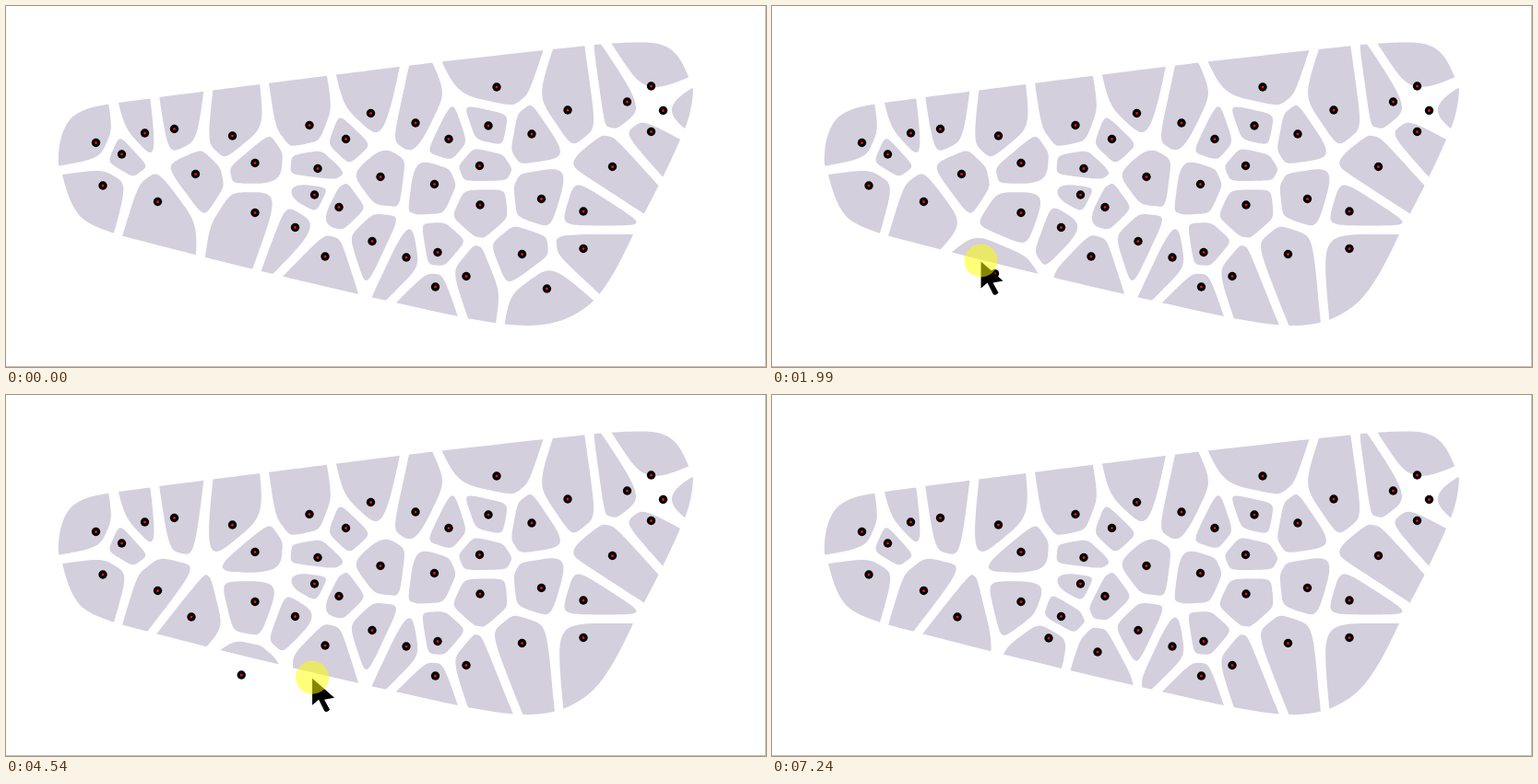
Write an HTML page with a canvas that moves like this. It is 824x392 px and loops after 7.8 s.

```html
<!DOCTYPE html>
<html lang="en">
<head>
<meta charset="utf-8">
<title>Voronoi wing</title>
<style>
html, body { margin: 0; width: 100%; height: 100%; overflow: hidden; background: #fff; }
canvas { display: block; }
</style>
</head>
<body>
<canvas id="stage" width="824" height="392"></canvas>
<script>
const ctx = document.getElementById('stage').getContext('2d');
const LOOP = 7800;
const INSET = 4.8;
const MIN_EDGE = 8.5;
const LAG = 100;
const BOX = [[-60, -60], [895, -60], [895, 415], [-60, 415]];

// Sites that stay in place
const FIXED = [
  [97.5, 148.5], [125.5, 161], [150.5, 138], [182.5, 133.5], [245.5, 141], [329, 129.5], [368.5, 144.5],
  [395.5, 116.5], [444, 127], [480, 144.5], [523, 130], [532, 88], [570, 139], [609, 113], [673.5, 104],
  [699.5, 87], [712.5, 113.5], [699.5, 136.5], [657.5, 174.5], [626, 223], [626, 263.5], [559.5, 269.5],
  [580.5, 209.5], [514, 216], [513.5, 173.5], [464.5, 193.5], [406, 185.5], [338, 176.5], [334.5, 205],
  [361, 218.5], [397, 255.5], [434, 273], [468, 267.5], [465.5, 305], [499, 293.5], [313.5, 240.5],
  [270, 224.5], [270, 170.5], [164.5, 212.5], [105, 195]
];

// Pointer strokes: smooth curves through evenly timed points
const STROKES = [
  { from: 70, to: 2390, pts: [[604, 382], [586.5, 307], [530, 350], [389, 363], [296, 332], [225, 275], [201, 241]] },
  { from: 2600, to: 4060, pts: [[201, 241], [205.5, 182.5], [202, 187], [165, 213], [128, 270.5]] },
  { from: 4060, to: 5160, pts: [[128, 270.5], [185, 298], [365, 306], [330, 282], [300, 264]] },
  { from: 5560, to: 7240, pts: [[300, 264], [346, 272], [400, 330], [310, 342], [315, 302], [353, 279], [450, 322], [680, 390]] }
];

// Each drag moves the site found under the pointer when pressed
const DRAGS = [{ from: 457, to: 2590 }, { from: 2965, to: 5390 }, { from: 5800, to: 6760 }];

const wing = new Path2D(
  'M57 172 C56 149 62 128 74 119 C85 111 98 108.5 113 106.5 C140 102 400 69 472 60.5 ' +
  'C530 54 600 46 640 42 C665 40 685 39 700 40 C722 42 731 54 740 77 L745 91 ' +
  'C744 112 739 128 731 145 C715 182 700 210 680 248 C665 280 652 305 637 320 ' +
  'C615 341 590 347 565 347 C545 347 520 343 490 337 C420 322 262 286 126 249.5 ' +
  'C101 242 88 236 80 228 C69 215 64 195 61 183 Z');
const arrow = new Path2D('M0 1 L0 30 L7 24 L13 36 Q15 39 19 35 L13 24 L24 22 Z');

const mid = (a, b) => [(a[0] + b[0]) / 2, (a[1] + b[1]) / 2];
const dist = (a, b) => Math.hypot(b[0] - a[0], b[1] - a[1]);
const clamp = (v, lo, hi) => Math.min(Math.max(v, lo), hi);

const spline = (a, b, c, d, u) =>
  b + u / 2 * (c - a + u * (2 * a - 5 * b + 4 * c - d + u * (3 * (b - c) + d - a)));

function pointer(t) {
  const { from, to, pts } = STROKES.filter(s => s.from <= t).pop() || STROKES[0];
  const last = pts.length - 1;
  const pos = clamp((t - from) / (to - from), 0, 1) * last;
  const i = Math.min(Math.floor(pos), last - 1);
  const at = k => pts[clamp(k, 0, last)];
  return [0, 1].map(n => spline(at(i - 1)[n], at(i)[n], at(i + 1)[n], at(i + 2)[n], pos - i));
}

const sitesAt = t => FIXED.concat(DRAGS.map(d => pointer(clamp(t - LAG, d.from, d.to))));

// Keeps the part of poly nearer to a than to b, less the inset
function clipHalf(poly, a, b) {
  const len = dist(a, b) || 1;
  const nx = (b[0] - a[0]) / len, ny = (b[1] - a[1]) / len;
  const m = mid(a, b);
  const side = p => (p[0] - m[0]) * nx + (p[1] - m[1]) * ny + INSET;
  const out = [];
  poly.forEach((p, i) => {
    const q = poly[(i + 1) % poly.length];
    const sp = side(p), sq = side(q);
    if (sp <= 0) out.push(p);
    if ((sp <= 0) !== (sq <= 0)) {
      const u = sp / (sp - sq);
      out.push([p[0] + (q[0] - p[0]) * u, p[1] + (q[1] - p[1]) * u]);
    }
  });
  return out;
}

const cell = (site, sites) =>
  sites.reduce((poly, other) => other === site ? poly : clipHalf(poly, site, other), BOX);

// Joins edge midpoints with the corners as handles; short edges are skipped
function fillSmooth(poly) {
  const edges = poly
    .map((a, i) => ({ a, b: poly[(i + 1) % poly.length] }))
    .filter(e => dist(e.a, e.b) > MIN_EDGE);
  if (edges.length < 2) return;
  ctx.beginPath();
  ctx.moveTo(...mid(edges[0].a, edges[0].b));
  edges.forEach((e, i) => {
    const next = edges[(i + 1) % edges.length];
    ctx.bezierCurveTo(...e.b, ...next.a, ...mid(next.a, next.b));
  });
  ctx.fill();
}

function disc([x, y], r, color) {
  ctx.fillStyle = color;
  ctx.beginPath();
  ctx.arc(x, y, r, 0, Math.PI * 2);
  ctx.fill();
}

function drawPointer(t) {
  const p = pointer(t);
  ctx.save();
  ctx.translate(...p);
  ctx.fillStyle = '#000';
  ctx.fill(arrow);
  ctx.restore();
  if (DRAGS.some(d => t >= d.from && t < d.to)) disc(p, 18, 'rgba(255,255,0,.52)');
}

function draw(t) {
  const sites = sitesAt(t);
  ctx.fillStyle = '#fff';
  ctx.fillRect(0, 0, 824, 392);

  ctx.save();
  ctx.clip(wing);
  ctx.fillStyle = '#d3cfdd';
  for (const site of sites) fillSmooth(cell(site, sites));
  ctx.restore();

  for (const site of sites) {
    disc(site, 4.7, '#000');
    disc(site, 1.5, '#e0101c');
  }
  ctx.fillStyle = '#c0c0c0';
  ctx.fillRect(823, 0, 1, 392);
  ctx.fillRect(0, 391, 824, 1);
  if (t >= 70 && t < 7240) drawPointer(t);
}

const start = performance.now();
function tick() {
  draw((performance.now() - start) % LOOP);
  requestAnimationFrame(tick);
}
tick();
</script>
</body>
</html>
```
